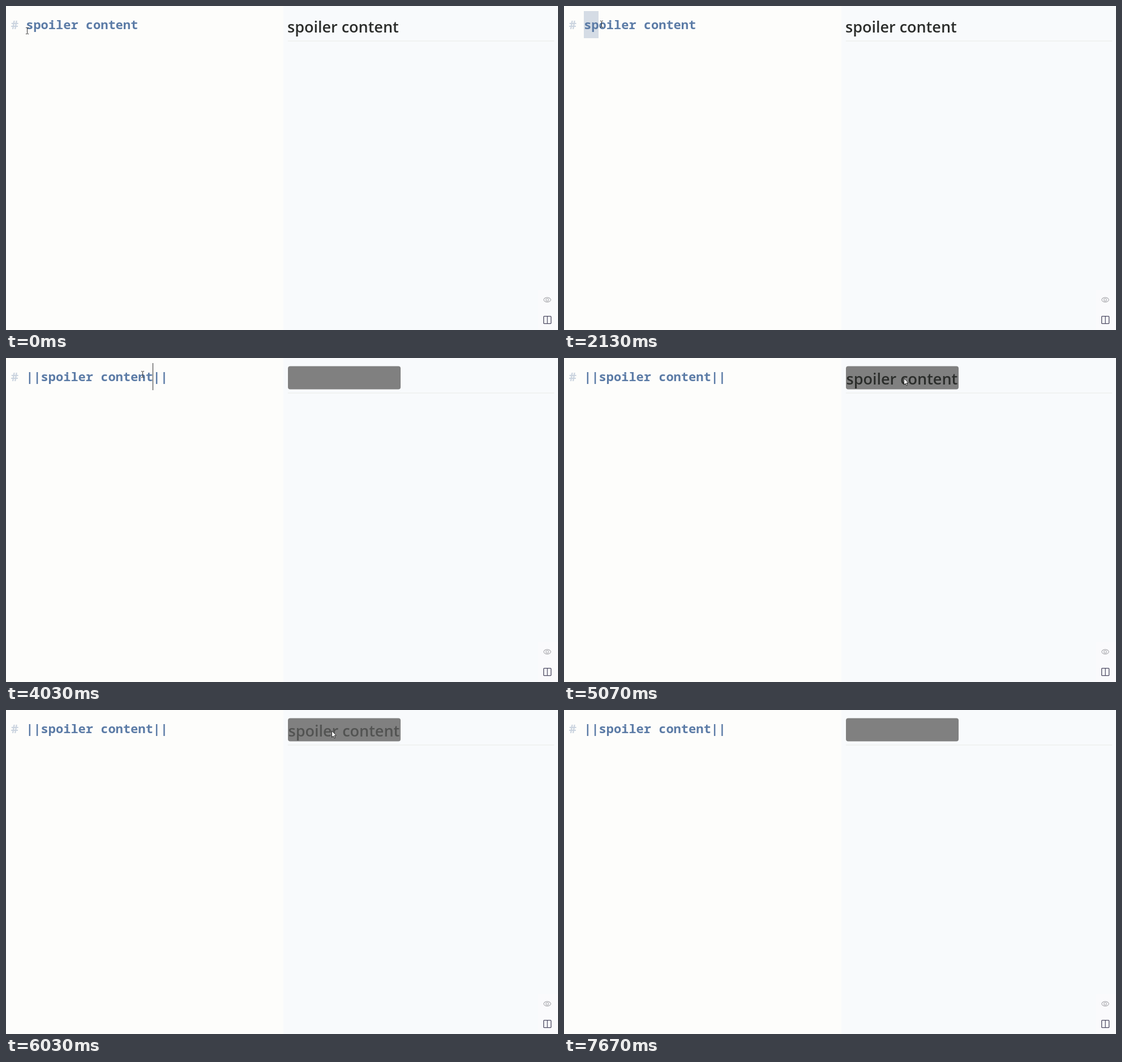
These frames come from a looping animation (975x574 px, 7.71 s). An HTML page with a canvas:

```html
<!DOCTYPE html>
<html lang="en">
<head>
<meta charset="utf-8">
<title>Spoiler syntax</title>
<style>
  html, body { margin: 0; width: 100%; height: 100%; overflow: hidden; background: #fdfdfb; }
  canvas { display: block; width: 975px; height: 574px; }
</style>
</head>
<body>
<canvas id="stage" width="975" height="574"></canvas>
<script>
const ctx = document.getElementById('stage').getContext('2d');
const LOOP = 7710;
const CELL = 13.2, LEFT = 8.8, START = LEFT + 2 * CELL;
const PHRASE = 'spoiler content';
const MONO = 'bold 22px "Noto Sans Mono", "DejaVu Sans Mono", monospace';
const HEAD = '600 27px "Open Sans", "Noto Sans", sans-serif';

const WRAP_ONE = 3400, WRAP_TWO = 3700, HIDE_CURSOR = 7400;
const FADE = 300;

// Pointer path: time, x, y
const PATH = [
  [0, 37.5, 44], [200, 37.5, 44], [750, 32, 32.5], [1900, 32, 32.5],
  [2800, 241.5, 28.5], [4150, 241.5, 28.5], [4750, 560, 50],
  [5050, 600, 36], [5350, 586, 44], [5630, 571, 80],
  [5800, 568, 72], [6050, 575, 36], [6250, 568, 42], [6500, 555, 108], [LOOP, 555, 108]
];
// Spoiler visibility: start of fade, target opacity
const REVEALS = [[4740, 1], [5580, 0], [5870, 1], [6490, 0]];

const clamp = v => Math.max(0, Math.min(1, v));
const ease = v => v * v * (3 - 2 * v);

function pointerAt(t) {
  let i = 0;
  while (i < PATH.length - 2 && t >= PATH[i + 1][0]) i++;
  const [t0, x0, y0] = PATH[i], [t1, x1, y1] = PATH[i + 1];
  const k = ease(clamp((t - t0) / (t1 - t0)));
  return { x: x0 + (x1 - x0) * k, y: y0 + (y1 - y0) * k };
}

function revealAt(t) {
  let value = 0;
  for (const [at, to] of REVEALS) value += (to - value) * clamp((t - at) / FADE);
  return value;
}

function rect(x, y, w, h, color) {
  ctx.fillStyle = color;
  ctx.fillRect(x, y, w, h);
}

function text(str, x, y, font, color) {
  ctx.font = font;
  ctx.fillStyle = color;
  ctx.fillText(str, x, y);
}

function line(points, color, width) {
  ctx.beginPath();
  points.forEach(([x, y], i) => i ? ctx.lineTo(x, y) : ctx.moveTo(x, y));
  ctx.strokeStyle = color;
  ctx.lineWidth = width;
  ctx.stroke();
}

function drawPanes() {
  rect(0, 0, 490, 574, '#fdfdfb');
  rect(490, 0, 485, 574, '#f8fafc');
  rect(498, 61.5, 470, 1, '#ecede8');
}

function drawIcons() {
  rect(940, 503, 35, 71, '#fafafc');
  ctx.beginPath();
  ctx.moveTo(949.5, 520.5);
  ctx.bezierCurveTo(952, 515, 960, 515, 962.5, 520.5);
  ctx.bezierCurveTo(960, 526, 952, 526, 949.5, 520.5);
  ctx.moveTo(958.3, 520.5);
  ctx.arc(956, 520.5, 2.3, 0, 7);
  ctx.strokeStyle = '#b2b2b6';
  ctx.lineWidth = 1.1;
  ctx.stroke();

  ctx.beginPath();
  ctx.roundRect(949.7, 549.7, 13, 13, 1);
  ctx.strokeStyle = '#4c4a62';
  ctx.lineWidth = 1.3;
  ctx.stroke();
  line([[956.2, 549.7], [956.2, 562.7]], '#4c4a62', 1.2);
}

function drawEditor(t, pointer) {
  const bars = t < WRAP_ONE ? 0 : t < WRAP_TWO ? 1 : 2;
  const textX = START + bars * CELL;
  if (t >= 1900 && t < WRAP_TWO) {
    const count = Math.max(0, Math.min(PHRASE.length, Math.round((pointer.x - START) / CELL)));
    rect(Math.round(textX), 9, Math.round(count * CELL), 48, '#d5dce5');
  }
  text('#', LEFT, 41, MONO, '#cbd4df');
  const pipes = '|'.repeat(bars);
  text(pipes + PHRASE + pipes, START, 41, MONO, '#5b7ba6');

  const atStart = t >= 1700 && t < 1950;
  const afterWrap = t >= WRAP_TWO && t < 4230 || t >= 4730 && t < 5000;
  if (atStart) rect(35, 9, 1, 48, '#333');
  if (afterWrap) rect(259, 9, 1, 48, '#333');
}

function drawPreview(t) {
  if (t < WRAP_TWO) {
    text(t < WRAP_ONE ? PHRASE : '|' + PHRASE + '|', 497, 47, HEAD, '#2b2d2b');
    return;
  }
  ctx.beginPath();
  ctx.roundRect(498, 14.5, 199, 41, 4);
  ctx.fillStyle = '#808080';
  ctx.fill();
  ctx.globalAlpha = revealAt(t);
  text(PHRASE, 498.5, 47, HEAD, '#2b2d2b');
  ctx.globalAlpha = 1;
}

function drawBeam({ x, y }) {
  x = Math.floor(x) + 0.5;
  y = Math.round(y);
  line([[x, y - 5], [x, y + 5]], '#333', 1);
  for (const dy of [-5.5, 5.5]) {
    line([[x - 2.5, y + dy], [x - 0.5, y + dy]], '#333', 1);
    line([[x + 0.5, y + dy], [x + 2.5, y + dy]], '#333', 1);
  }
}

function drawArrow({ x, y }) {
  const shape = [[0, 0], [0, 11.5], [2.6, 9], [4.5, 13], [6.2, 12.2], [4.4, 8.3], [7.8, 8]];
  ctx.save();
  ctx.translate(Math.round(x) + 0.5, Math.round(y));
  ctx.beginPath();
  shape.forEach(([px, py]) => ctx.lineTo(px, py));
  ctx.closePath();
  ctx.fillStyle = '#fff';
  ctx.fill();
  ctx.strokeStyle = '#2a2a2a';
  ctx.lineWidth = 1;
  ctx.stroke();
  ctx.restore();
}

function draw(t) {
  const pointer = pointerAt(t);
  drawPanes();
  drawIcons();
  drawEditor(t, pointer);
  drawPreview(t);
  if (t < HIDE_CURSOR) (pointer.x < 490 ? drawBeam : drawArrow)(pointer);
}

const began = performance.now();
function tick() {
  draw((performance.now() - began) % LOOP);
  requestAnimationFrame(tick);
}
tick();
</script>
</body>
</html>
```
